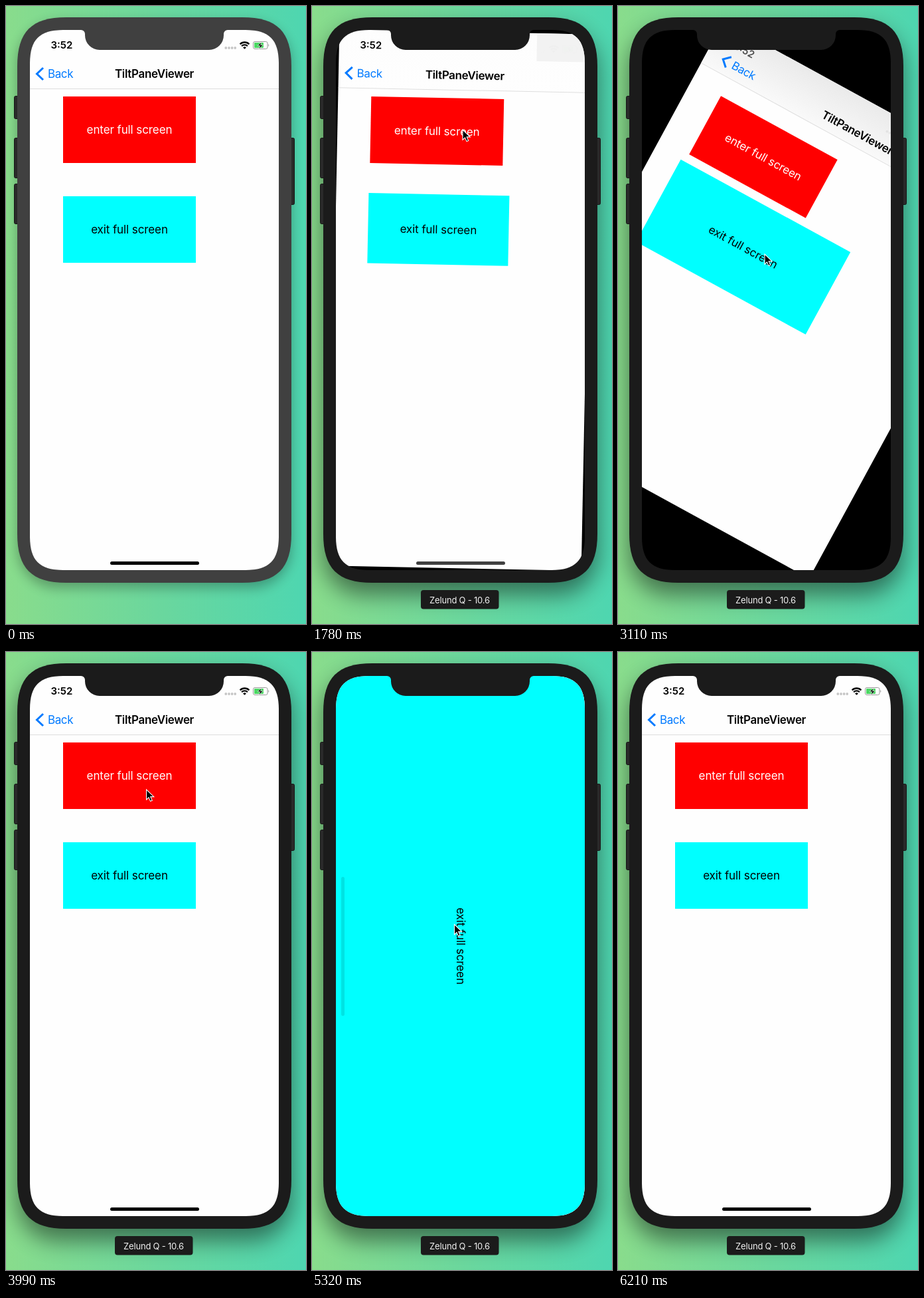
Recreate the animation shown at these times as an HTML page. Size 452 by 929 pixels, loop 6660 ms.

```html
<!DOCTYPE html>
<html lang="en">
<head>
<meta charset="utf-8">
<title>Full screen demo</title>
<style>
  html, body { margin: 0; width: 100%; height: 100%; overflow: hidden; }
  svg { display: block; width: 100vw; height: 100vh; }
  text { font-family: Inter, Roboto, sans-serif; font-size: 17px; letter-spacing: -.1px; }
  .mid { text-anchor: middle; }
  .blue { fill: #007aff; letter-spacing: -.4px; }
  .title { font-weight: 600; letter-spacing: -.35px; }
  .clock { font-size: 15px; font-weight: 600; letter-spacing: 0; }
  .device { font-size: 13px; letter-spacing: -.2px; fill: #f2f2f2; }
</style>
</head>
<body>
<svg viewBox="0 0 452 929" xmlns="http://www.w3.org/2000/svg">
  <defs>
    <linearGradient id="backdrop">
      <stop offset="0" stop-color="#89dc8c"/>
      <stop offset=".5" stop-color="#6bd79d"/>
      <stop offset="1" stop-color="#4ed6b0"/>
    </linearGradient>
    <linearGradient id="barShade" x2="0" y2="1">
      <stop offset="0" stop-color="#e9e9e9"/>
      <stop offset="1" stop-color="#f9f9f9"/>
    </linearGradient>
    <filter id="soft" x="-20%" y="-10%" width="140%" height="120%"><feGaussianBlur stdDeviation="9"/></filter>
    <filter id="wide" x="-20%" y="-10%" width="140%" height="120%"><feGaussianBlur stdDeviation="17"/></filter>
    <clipPath id="screen"><path id="screenShape"/></clipPath>
  </defs>

  <rect width="452" height="929" fill="url(#backdrop)"/>
  <rect id="restShadow" x="17" y="25" width="413" height="850" rx="60" opacity=".28" filter="url(#soft)"/>
  <rect id="focusShadow" x="17" y="35" width="413" height="850" rx="60" opacity=".47" filter="url(#wide)"/>

  <g fill="#2a2a2a" stroke="#151515">
    <rect x="12.5" y="135.5" width="8" height="34" rx="2"/>
    <rect x="12.5" y="198.5" width="8" height="60" rx="2"/>
    <rect x="12.5" y="267.5" width="8" height="60" rx="2"/>
    <rect x="426.5" y="198.5" width="8" height="100" rx="2"/>
  </g>
  <g id="label">
    <rect x="164" y="878" width="117.500" height="28.500" rx="4" fill="#1b1b1b"/>
    <text class="device mid" x="222.5" y="897.5">Zelund Q - 10.6</text>
  </g>
  <path id="bezel"/>

  <g clip-path="url(#screen)">
    <rect x="36" y="36" width="375" height="812"/>
    <g id="view">
      <rect id="page" fill="#fefefe"/>
      <rect id="bar" fill="url(#barShade)"/>
      <rect id="barEnd" x="298" height="42" fill="#f2f2f2"/>
      <rect id="barLine" height="1" fill="#dedede"/>
      <g transform="translate(-36 -36)">
        <text id="clock" class="clock" x="67.5" y="64">3:52</text>
        <g id="icons">
          <g fill="#c6c6c6">
            <circle cx="331.3" cy="63" r="1.9"/><circle cx="336" cy="63" r="1.9"/>
            <circle cx="340.6" cy="63" r="1.9"/><circle cx="345.2" cy="63" r="1.9"/>
          </g>
          <path d="M352.6 57.4a9.7 9.7 0 0 1 13.8 0M355.1 60.3a6.2 6.2 0 0 1 8.8 0" fill="none" stroke="#000" stroke-width="2.3"/>
          <path d="M357.1 62.4a3.4 3.4 0 0 1 4.8 0l-2.4 2.4z"/>
          <rect x="372.5" y="53.5" width="21.5" height="11" rx="2.5" fill="none" stroke="#999"/>
          <rect x="374" y="55" width="14" height="8" rx="1" fill="#4cd964"/>
          <path d="M395.3 57q2 2 0 4z" fill="#999"/>
          <path d="M385 54l-6 5.8h3.6l-1.4 4.8 6-6h-3.7z" stroke="#fefefe" stroke-width=".6"/>
        </g>
        <g id="back">
          <path d="M56 93l-9.5 9 9.5 9" fill="none" stroke="#007aff" stroke-width="3"/>
          <text class="blue" x="63" y="108">Back</text>
        </g>
        <rect x="86" y="136" width="200" height="100" fill="#f00"/>
        <text class="mid" x="186" y="192" fill="#fff">enter full screen</text>
      </g>
      <text id="title" class="title mid">TiltPaneViewer</text>
      <rect id="panel" fill="#0ff"/>
      <text id="panelText" class="mid">exit full screen</text>
    </g>
    <rect id="homeTall" x="157" y="835" width="134" height="5" rx="2.5"/>
    <rect id="homeWide" x="44" y="338" width="5" height="209" rx="2.5" opacity=".11"/>
  </g>
  <path id="notch" d="M113 35v1a6 6 0 0 1 6 6v2a22 22 0 0 0 22 22h165a22 22 0 0 0 22-22v-2a6 6 0 0 1 6-6v-1z"/>
  <path id="cursor" d="M0 0v15.200l3.500-3.300 2.500 5.700 2.700-1.200-2.500-5.500h5z" stroke="#fff" stroke-width="1.100"/>
</svg>

<script>
const LOOP = 6660, STEP = 148, STEPS = 45, STEP_LEAD = 18;
const el = {};
document.querySelectorAll('svg [id]').forEach(node => { el[node.id] = node; });

const set = (node, attrs) => {
  for (const name in attrs) node.setAttribute(name, attrs[name]);
};
const show = (node, on) => set(node, { visibility: on ? 'visible' : 'hidden' });
const clamp = x => Math.max(0, Math.min(1, x));
const mix = (a, b, k) => a + (b - a) * k;
const ease = (time, start, length) => {
  const x = clamp((time - start) / length);
  return x * x * (3 - 2 * x);
};

// Rectangle with continuous-curvature corners.
function smoothRect(x, y, w, h, r) {
  const e = 1.25 * r, c = .365 * r, d = e - c;
  return `M${x + e} ${y}h${w - 2 * e}c${d} 0 ${e} ${c} ${e} ${e}` +
    `v${h - 2 * e}c0 ${d} ${-c} ${e} ${-e} ${e}` +
    `h${2 * e - w}c${-d} 0 ${-e} ${-c} ${-e} ${-e}` +
    `v${2 * e - h}c0 ${-d} ${c} ${-e} ${e} ${-e}z`;
}
set(el.bezel, { d: smoothRect(17, 17, 413, 850, 59) });
set(el.screenShape, { d: smoothRect(36, 36, 375, 812, 40) });

// Each trip into full screen: when it opens and when it closes.
const trips = [[1756, 2962], [4140, 5333]];
const progress = (time, lead, closeLength) => trips.reduce(
  (sum, [open, close]) => sum + ease(time, open - lead, 300) - ease(time, close, closeLength), 0);

// Pointer stops: time, x, y
const stops = [
  [444, 240, 925], [1480, 227, 186], [2072, 227, 186], [2812, 221, 373], [3108, 221, 373],
  [4144, 211, 197], [4440, 211, 197], [5032, 214, 403], [5180, 214, 403],
  [5476, 215, 416], [6068, 221, 877]
];

function movePointer(time) {
  show(el.cursor, time >= 592 && time <= 6068);
  const next = stops.findIndex(stop => stop[0] >= time);
  if (next < 1) return;
  const [t0, x0, y0] = stops[next - 1], [t1, x1, y1] = stops[next];
  const k = ease(time, t0, t1 - t0);
  set(el.cursor, { transform: `translate(${mix(x0, x1, k)} ${mix(y0, y1, k)})` });
}

function drawView(turn, grow) {
  const w = mix(375, 812, turn), h = mix(812, 375, turn);
  const barHeight = mix(88, 32, turn);
  set(el.view, { transform: `translate(223.5 442) rotate(${90 * turn}) translate(${-w / 2} ${-h / 2})` });
  set(el.page, { width: w, height: h });
  set(el.bar, { width: w, height: barHeight, opacity: clamp(turn * 3) });
  set(el.barEnd, { width: w - 298, opacity: turn ? clamp(1 - turn * 2) : 0 });
  set(el.barLine, { y: barHeight, width: w });
  set(el.clock, { opacity: 1 - turn });
  set(el.icons, { opacity: turn || 1 });
  set(el.back, { transform: `translate(${50 * turn} ${-50 * turn})` });
  set(el.title, { x: w / 2, y: mix(72, 22, turn) });

  const x = mix(50, 0, grow), y = mix(250, 0, grow);
  const width = mix(200, 812, grow), height = mix(100, 375, grow);
  set(el.panel, { x, y, width, height });
  set(el.panelText, { x: x + width / 2, y: y + height / 2 + 6 });
  set(el.homeTall, { opacity: clamp(1 - 20 * turn) });
  show(el.homeWide, grow > .99);
}

function draw(now) {
  const time = Math.floor((now % LOOP + STEP_LEAD) / STEP) % STEPS * STEP;
  const focused = time >= 1628;
  const frameColor = time >= 1776 ? '#1b1b1b' : '#404040';
  show(el.restShadow, !focused);
  show(el.focusShadow, focused);
  show(el.label, focused);
  set(el.bezel, { fill: frameColor });
  set(el.notch, { fill: frameColor });
  const settle = v => v < 1e-3 ? 0 : v;
  drawView(settle(progress(time, 0, 234)), settle(progress(time, 5, 193)));
  movePointer(time);
}

const begin = performance.now();
function tick() {
  draw(performance.now() - begin);
  requestAnimationFrame(tick);
}
tick();
</script>
</body>
</html>
```
